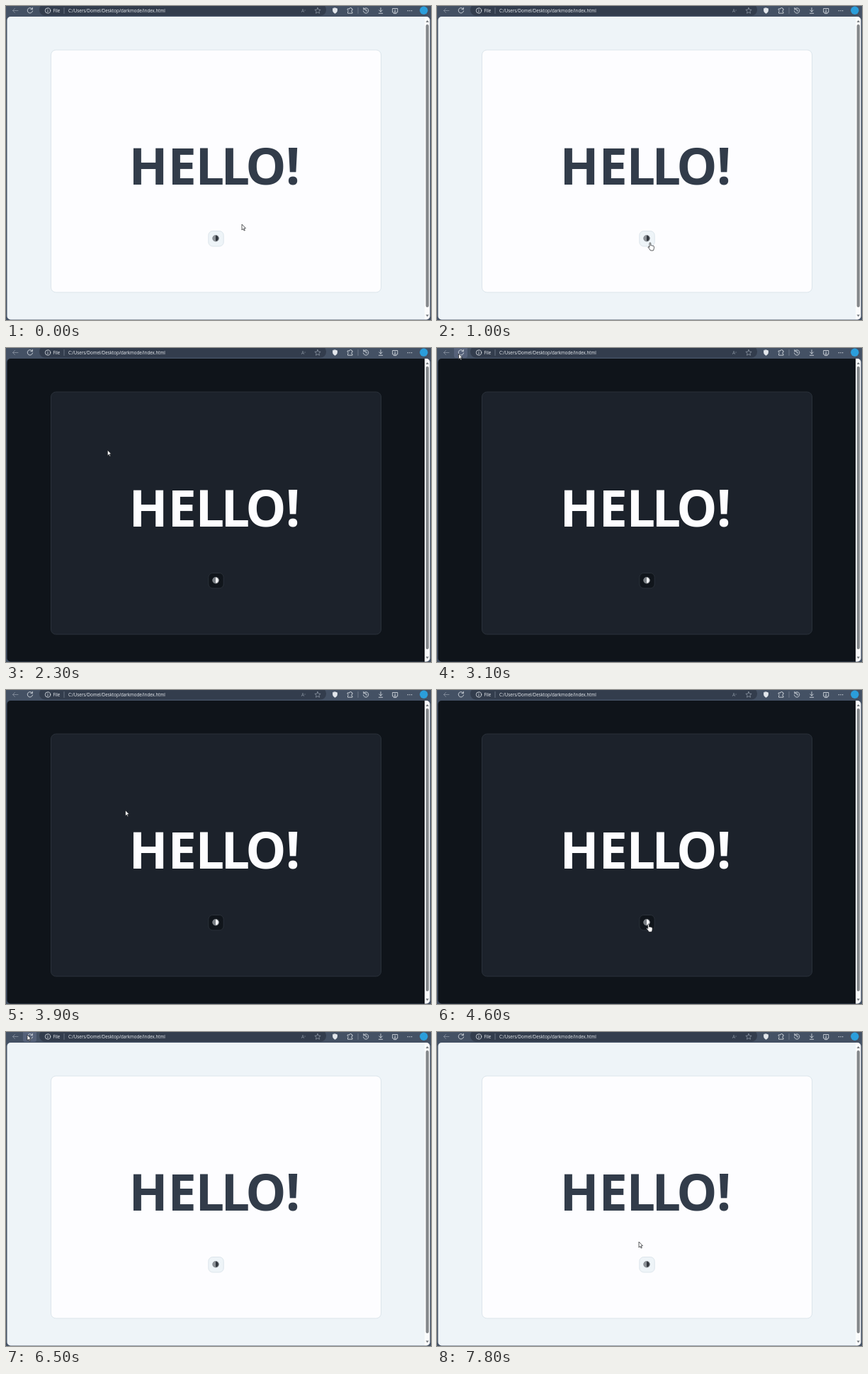
Animation of 600x443 px, one loop 8400 ms. Source, as an HTML page:

```html
<!DOCTYPE html>
<html lang="en">
<head>
<meta charset="utf-8">
<title>Dark mode toggle</title>
<style>
  html, body { margin: 0; width: 100%; height: 100%; overflow: hidden; background: #445164; }
  svg {
    display: block; width: 100vw; height: 100vh;
    --page: #eef4f8; --card: #fdfdff; --edge: #dce5eb; --ink: #323c4a;
    --button: #eef4f8; --left: #8c9197; --right: #30353c;
  }
  svg.dark {
    --page: #0f141a; --card: #1c222b; --edge: #2a313a; --ink: #fdfdff;
    --button: #10151b; --left: #7b8086; --right: #f4f5f7;
  }
  text { font-family: "Open Sans", "Noto Sans", sans-serif; }
  .bar text { font-size: 6.2px; fill: #edf0f4; }
  .icons { fill: none; stroke: #e3e7ec; stroke-width: .8; stroke-linecap: round; stroke-linejoin: round; }
  .dim { stroke: #8b95a3; }
  .card, .toggle { stroke: var(--edge); stroke-width: 1; }
  .card { fill: var(--card); }
  .toggle { fill: var(--button); }
  .hello { font-size: 72px; font-weight: 700; fill: var(--ink); }
  #cursor path { fill: #fff; stroke: #15181c; stroke-width: .7; stroke-linejoin: round; }
</style>
</head>
<body>
<svg id="stage" viewBox="0 0 600 443">
  <rect width="600" height="443" fill="#445164"/>

  <g class="bar">
    <rect x="47" y="-3" width="405" height="16.5" rx="8" fill="#333d4d"/>
    <rect id="reloadHover" x="24" y="-3" width="19" height="17" rx="3" fill="#56627a"/>
    <text x="66.5" y="8.9">File</text>
    <text x="88" y="8.9">C:/Users/Domel/Desktop/darkmode/index.html</text>
    <text x="417" y="9" style="fill:#8b95a3">A<tspan dy="-2" font-size="4">»</tspan></text>
    <g class="icons">
      <path class="dim" d="M17 6.5H9.5M12.5 3.5l-3 3 3 3"/>
      <path d="M37 4.2A3.7 3.7 0 1 0 37.6 7M37.4 2.3V4.7H35"/>
      <circle cx="59" cy="6.5" r="3.7"/>
      <path d="M59 6.2V8.4M59 4.6v.1"/>
      <path class="dim" d="M82 2.5V10.5M497 2.5V10.5" stroke-width=".6"/>
      <path class="dim" d="M440 2.4l1.2 2.7 2.9.3-2.2 2 .6 2.9-2.5-1.5-2.5 1.5.6-2.9-2.2-2 2.9-.3Z"/>
      <path d="M464.5 2.8l3 1V6.7q-.3 2.5-3 3.7-2.7-1.2-3-3.7V3.8Z" fill="#e3e7ec"/>
      <path d="M482.5 4H485a1.5 1.5 0 0 1 3 0h1V6a1.3 1.3 0 0 0 0 2.6V10.2H482.5V8.2a1.5 1.5 0 0 0 0-2.5Z"/>
      <path d="M505 4.4A3.7 3.7 0 1 1 504.4 7M504.8 2.4V4.7H507M508 4.5V6.9H509.8"/>
      <path d="M529 2.6V8M526.7 5.9L529 8.2l2.3-2.3M526.3 10.3h5.4"/>
      <path d="M547 9H545.7V3.5H552.8V9H551.5M549.2 5v2.5M547.5 10.3L549.2 7.8l1.7 2.5Z"/>
      <path d="M567.3 6.7h.01M570 6.7h.01M572.7 6.7h.01" stroke-width="1.3"/>
    </g>
    <circle cx="589.8" cy="6.3" r="5.7" fill="#2b9edb"/>
  </g>

  <clipPath id="window"><rect x="1.5" y="15" width="597" height="427.5" rx="5"/></clipPath>
  <g clip-path="url(#window)">
    <rect x="1" y="15" width="590" height="428" fill="var(--page)"/>
    <rect x="591" y="15" width="8" height="428" fill="#fafbfc"/>
    <rect x="592.7" y="26" width="4.2" height="399" rx="2.1" fill="#85888c"/>
    <path d="M592.6 23l2.2-3 2.2 3ZM592.6 435.5l2.2 3 2.2-3Z" fill="#777b80"/>
  </g>

  <rect class="card" x="63.5" y="62" width="466" height="342" rx="7"/>
  <text class="hello" x="173.5" y="252" dx="0 0 -1.5 -4.5 -4.5 -1">HELLO!</text>
  <rect class="toggle" x="285.8" y="317.5" width="21.4" height="21.5" rx="6"/>
  <path d="M296 323.2a4.5 4.5 0 0 0 0 9Z" fill="var(--left)"/>
  <path d="M296 323.2a4.5 4.5 0 0 1 0 9Z" fill="var(--right)"/>
  <circle cx="296" cy="327.7" r="4.2" fill="none" stroke="var(--left)" stroke-width=".8"/>

  <g id="cursor">
    <path id="arrow" d="M0 0V8L1.9 6.3 3.1 9 4.3 8.5 3.1 5.8 5.4 5.6Z"/>
    <path id="hand" d="M-1 6.5V.8A.9.9 0 0 1 .8.8V4q.9-.7 1.6.2.9-.5 1.5.3 1.3-.2 1.5 1V7.5Q5.2 9.5 4.2 11H.4Q-.5 9-2.6 7-3.4 6-2.6 5.6-2 5.3-1 6.5Z"/>
  </g>
</svg>
<script>
  const LOOP = 8400, STEP = 100;
  const START = [333, 308];
  // first step, last step (ms), destination of the pointer
  const moves = [
    [400, 1000, 301, 334],
    [1900, 2700, 30.5, 8],
    [3600, 4300, 306.5, 331.5],
    [4500, 4600, 298.7, 330.3],
    [5700, 6500, 30, 4],
    [6700, 6700, 33, 4],
    [7100, 7800, 285, 296]
  ];
  const get = id => document.getElementById(id);
  const [stage, cursor, arrow, hand, reloadHover] =
    ["stage", "cursor", "arrow", "hand", "reloadHover"].map(get);
  const show = (node, on) => node.setAttribute("visibility", on ? "visible" : "hidden");
  const ease = p => p * p * (3 - 2 * p);

  function pointerAt(time) {
    let [x, y] = START;
    for (const [first, last, toX, toY] of moves) {
      if (time < first) break;
      const p = ease(Math.min(1, (time - first + STEP) / (last - first + STEP)));
      x += (toX - x) * p;
      y += (toY - y) * p;
    }
    return [x, y];
  }

  function draw(now) {
    const time = Math.floor(now % LOOP / STEP) * STEP;
    const [x, y] = pointerAt(time);
    const onToggle = x > 286 && x < 308 && y > 317 && y < 339;
    stage.classList.toggle("dark", time >= 1600 && time < 5100);
    cursor.setAttribute("transform", `translate(${x} ${y})`);
    show(hand, onToggle);
    show(arrow, !onToggle);
    show(reloadHover, x < 43 && y < 14);
  }

  const begin = performance.now();
  function tick() {
    draw(performance.now() - begin);
    requestAnimationFrame(tick);
  }
  tick();
</script>
</body>
</html>
```
